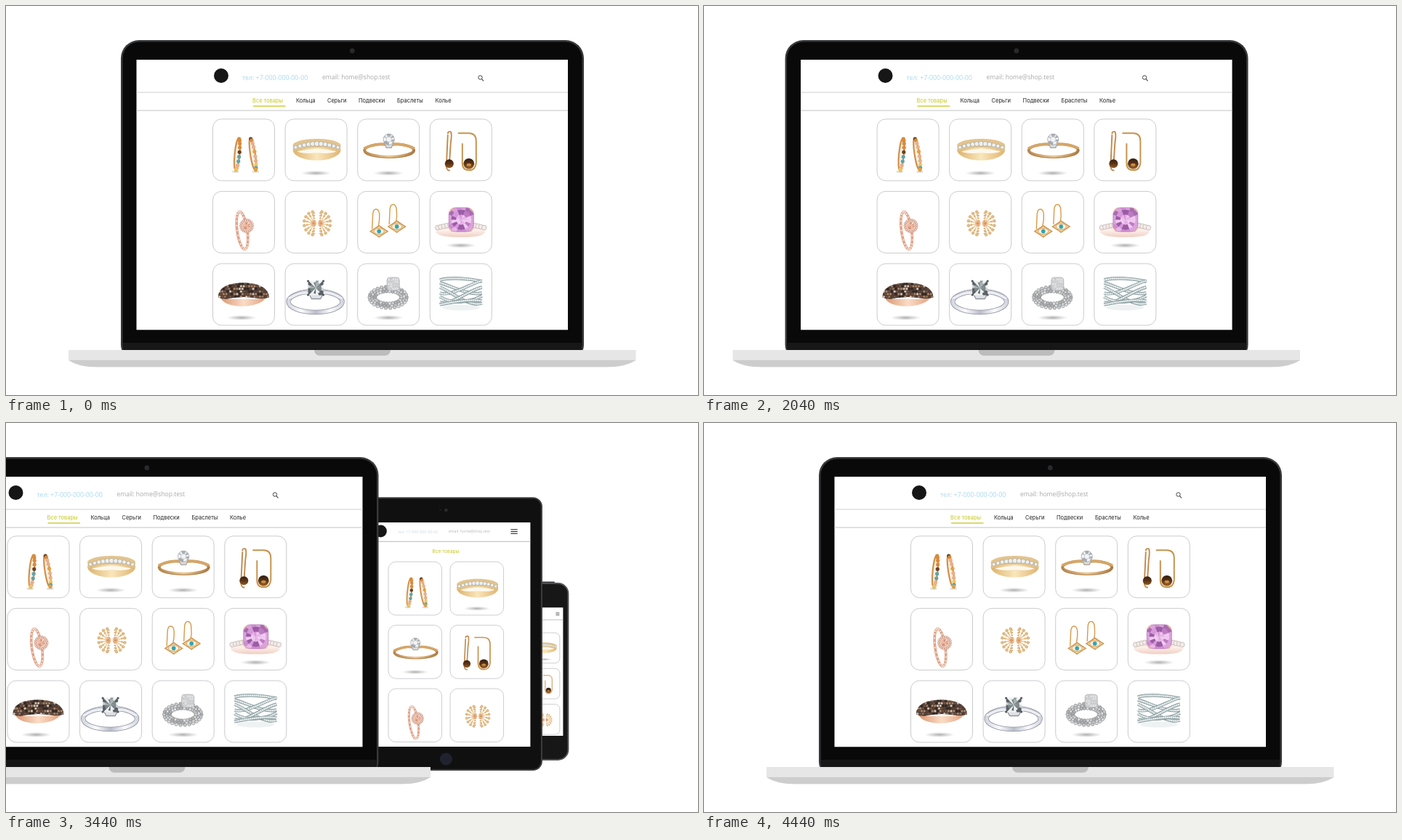
Recreate the animation shown at these times as an HTML page with a canvas. Size 952x536 px, loop 4.48 s.

```html
<!DOCTYPE html>
<html lang="ru">
<head>
<meta charset="utf-8">
<title>Jewellery shop on three screens</title>
<style>
html, body { margin: 0; width: 100%; height: 100%; overflow: hidden; background: #fff; }
canvas { display: block; }
</style>
</head>
<body>
<canvas id="stage" width="952" height="536"></canvas>
<script>
const g = document.getElementById('stage').getContext('2d');
const LOOP = 4480, STEP = 40, MOVE = 300;
const TAU = Math.PI * 2;
const SANS = '"Open Sans", "Noto Sans", sans-serif';
const GEO = 'Inter, Roboto, sans-serif';
const PHONE = 'тел: +7-000-000-00-00', MAIL = 'email: home@shop.test';
const LIME = '#c6c81c';

// ---------- drawing helpers ----------
function paint(fill, stroke, w) {
  if (fill) { g.fillStyle = fill; g.fill(); }
  if (stroke) { g.strokeStyle = stroke; g.lineWidth = w || 1; g.stroke(); }
}
function oval(x, y, rx, ry, fill, stroke, w, rot = 0, from = 0, to = TAU) {
  g.beginPath();
  g.ellipse(x, y, rx, ry, rot, from, to);
  paint(fill, stroke, w);
}
const dot = (x, y, r, fill, stroke, w) => oval(x, y, r, r, fill, stroke, w);
function box(x, y, w, h, r, fill, stroke, lw) {
  g.beginPath();
  g.roundRect(x, y, w, h, r);
  paint(fill, stroke, lw);
}
function shape(d, fill, stroke, w) {
  const p = new Path2D(d);
  if (fill) { g.fillStyle = fill; g.fill(p); }
  if (stroke) { g.strokeStyle = stroke; g.lineWidth = w; g.stroke(p); }
}
function label(s, x, y, size, color, font = SANS, align = 'left') {
  g.font = size + 'px ' + font;
  g.textAlign = align;
  g.fillStyle = color;
  g.fillText(s, x, y);
}
function rule(x, y, w, color, h = 1) {
  g.fillStyle = color;
  g.fillRect(x, y, w, h);
}
function fade(x0, y0, x1, y1, ...colors) {
  const f = g.createLinearGradient(x0, y0, x1, y1);
  colors.forEach((c, i) => f.addColorStop(i / (colors.length - 1), c));
  return f;
}
function repeat(n, fn) {
  for (let i = 0; i < n; i++) fn(i, n > 1 ? i / (n - 1) : 0);
}
const noise = i => { const v = Math.sin(i * 91.7 + 3) * 4375.5; return v - Math.floor(v); };
const pick = (list, i) => list[Math.floor(noise(i) * list.length)];

function clipTo(path, draw) {
  g.save();
  g.clip(path);
  draw();
  g.restore();
}
function shadow(x = 43, y = 75) {
  g.save();
  g.translate(x, y);
  g.scale(1, 0.17);
  const f = g.createRadialGradient(0, 0, 0, 0, 0, 21);
  f.addColorStop(0, 'rgba(90,90,90,.5)');
  f.addColorStop(1, 'rgba(120,120,120,0)');
  dot(0, 0, 21, f);
  g.restore();
}
function gem(x, y, r, tones, seed = 1) {
  repeat(16, i => {
    const a = i * TAU / 16, b = a + TAU / 16 + 0.03;
    g.beginPath();
    g.moveTo(x, y);
    g.lineTo(x + r * Math.cos(a), y + r * Math.sin(a));
    g.lineTo(x + r * Math.cos(b), y + r * Math.sin(b));
    paint(pick(tones, i + seed));
  });
}

// ---------- jewellery, each in an 86 x 86 card ----------
const BEADS = ['#2e2620', '#d98a3a', '#f1c75b', '#6b4225', '#5fa3a8', '#e9b08a', '#e5a13f'];
function hoop(x, lean) {
  const c = Math.cos(lean), s = Math.sin(lean);
  oval(x, 49, 3.4, 22, '#fbf1e4', '#d0914e', 2.2, lean);
  repeat(10, (i, k) => {
    const a = -1.35 + k * 2.7;
    const u = 3 * Math.cos(a), v = 22 * Math.sin(a);
    dot(x + u * c - v * s, 49 + u * s + v * c, 2.6, pick(BEADS, i * 3 + x));
  });
  oval(x - 23 * s, 73, 5, 1.6, 'rgba(120,100,80,.22)');
}
function halfSun(x, dir) {
  oval(x + dir, 44.5, 4, 5, '#edbd92');
  dot(x + dir, 44.5, 2, '#dd9468');
  repeat(8, (i, k) => {
    const a = -1.4 + k * 2.8, u = dir * Math.cos(a), v = Math.sin(a);
    g.beginPath();
    g.moveTo(x + u * 5, 44.5 + v * 6);
    g.lineTo(x + u * 14, 44.5 + v * 16);
    paint(null, '#e7cb9c', 1.6);
    dot(x + u * 10, 44.5 + v * 11.5, 1.4, '#dfb475');
    dot(x + u * 14, 44.5 + v * 16, 1.9, '#e3bf87', '#cf9f62', 0.6);
  });
  repeat(9, i => dot(x, 30.5 + i * 3.5, 1, '#d6a269'));
}
function eye(x, y, hx) {
  shape(`M${x - 1} ${y - 8} C${x + 1} ${y - 14} ${hx + 9} ${y - 18} ${hx + 9} ${y - 24}
    C${hx + 8} ${y - 32} ${hx + 1} ${y - 33} ${hx} ${y - 24} L${hx - 1} ${y - 3}`, null, '#d79b4a', 1.4);
  shape(`M${x - 12} ${y} Q${x - 4} ${y - 5} ${x} ${y - 8} Q${x + 4} ${y - 5} ${x + 12} ${y}
    Q${x + 4} ${y + 5} ${x} ${y + 8} Q${x - 4} ${y + 5} ${x - 12} ${y}Z`, '#f0cf9a', '#c98e45', 1.2);
  oval(x, y, 7, 4, '#fbf3e2', '#c98e45', 0.7);
  dot(x, y, 2.8, '#35a4ad');
}

const items = [
  () => { hoop(34, 0.1); hoop(55.5, -0.16); },
  () => {
    shadow();
    oval(44, 43, 33, 14.5, fade(11, 0, 77, 0, '#dcb26b', '#f9e6bb', '#e0b470'));
    shape('M11 36 C17 25 71 25 77 36 L76 45 C66 38 22 38 12 45Z', '#e3c48d');
    shape('M17 45 Q44 38 71 45 Q64 49 44 47 Q24 49 17 45Z', '#fdf8ec');
    repeat(11, (i, k) => {
      const x = 15 + k * 58;
      dot(x, 34.5 + 5 * (2 * k - 1) ** 2, 3.5 - Math.abs(k - 0.5) * 2, '#eef0ef', '#aaa79c', 0.8);
    });
  },
  () => {
    shadow();
    oval(44, 43.5, 34, 9, null, fade(8, 0, 80, 0, '#b4824a', '#ebc994', '#aa763c'), 4);
    oval(44, 45.5, 34.5, 8.5, null, '#a8713a', 0.9, 0, 0.1, Math.PI - 0.1);
    shape('M9 41 Q25 33 39 36 M79 41 Q62 33 48 36', null, '#d5a668', 3.4);
    shape('M37 33 L40 40 H47 L50 33', '#dddcda', '#a9a49c', 1.2);
    gem(43.5, 28.5, 7.6, ['#f4f5f6', '#c3c6ca', '#dfe1e4', '#a4a9af']);
    dot(43.5, 28.5, 7.6, null, '#9da2a7', 0.8);
    dot(43.5, 28.5, 3.6, '#f3f4f5', '#b6babe', 0.6);
  },
  () => {
    shape('M25 21 Q25 17 29 18 Q31 21 29 33 L27 64 M25 22 L23 66 Q24 72 28 71', null, '#c08a4b', 1.9);
    const ball = fade(0, 53, 0, 71, '#271710', '#5b3416', '#b0702b');
    oval(27, 62, 6, 6, ball);
    shape('M39 20 H54 Q64 20 64 31 V61 Q63 71 54 71 Q45 71 45 61 V34', null, '#c6944f', 2);
    dot(54, 62, 7.4, ball);
    oval(54, 63.5, 3.2, 2, '#c98d42');
  },
  () => {
    oval(41, 54.5, 7, 26, null, '#dfa48a', 3.6, -0.14);
    repeat(24, i => {
      const a = i * TAU / 24, u = 7 * Math.cos(a), v = 26 * Math.sin(a);
      dot(41 + u + v * 0.14, 54.5 + v, 1.1, '#f8e6dd');
    });
    dot(47, 48, 9, '#f1d0c0');
    repeat(18, i => dot(47 + 8.2 * Math.cos(i * TAU / 18), 48 + 8.2 * Math.sin(i * TAU / 18), 1.4, '#f7e9e2', '#c2826a', 0.7));
    gem(47, 48, 5.2, ['#efb9a3', '#fae9df', '#d1917a']);
  },
  () => { halfSun(40.5, -1); halfSun(48.5, 1); },
  () => { eye(30, 55.5, 21.5); eye(54.5, 49, 45); },
  () => {
    shadow();
    shape('M8 52 Q12 43 44 43 Q74 43 77 52 L76 57 Q72 64 43 63.5 Q14 64 9 57Z', fade(0, 44, 0, 64, '#eed2c8', '#fdf0eb', '#f0cdc1'));
    repeat(16, (i, k) => dot(11 + k * 64, 50.5 - 5 * Math.sin(k * Math.PI), 3.3, '#f1ecea', '#c4b3af', 0.8));
    const stone = new Path2D();
    stone.roundRect(26.5, 23, 34, 33, 9);
    clipTo(stone, () => {
      gem(43.5, 39.5, 25, ['#cf8dd2', '#e8b8e9', '#a86bb0', '#dba2dc'], 5);
      gem(43.5, 39.5, 14, ['#f0c9f0', '#bd7cc2', '#d698d9', '#9a5ca4'], 9);
      gem(43.5, 39.5, 7, ['#f3cff2', '#d795d9', '#e9b5e9'], 3);
    });
    g.strokeStyle = '#b57bb8';
    g.lineWidth = 0.8;
    g.stroke(stone);
    shape('M27 29 L32 24 M60 29 L55 24 M27 51 L31 56 M60 51 L56 56', null, '#e8b4a0', 1.6);
  },
  () => {
    shadow(40);
    shape('M11 45 C12 64 68 64 75 45 Q64 51 43 49 Q20 51 11 45Z', fade(11, 0, 75, 0, '#d9966f', '#fbdcc6', '#e1a17c'));
    const dome = new Path2D('M8 47 C8 31 26 27 42 27 C60 27 77 32 78 47 Q70 50 60 48 Q43 45 26 48 Q16 51 8 47Z');
    g.fillStyle = '#4a3a33';
    g.fill(dome);
    clipTo(dome, () => repeat(140, i => {
      const col = i % 20, row = Math.floor(i / 20);
      dot(8 + col * 3.7 + (row % 2) * 1.8, 28 + row * 3.6, 1.6,
        pick(['#2f2724', '#70513f', '#a98468', '#d6c2b0', '#564139', '#96745e'], i));
    }));
  },
  () => {
    oval(42, 53, 37, 14.5, null, '#8b909c', 6.4);
    oval(42, 53, 37, 14.5, null, fade(3, 0, 82, 0, '#d3d6df', '#fbfbfd', '#b9bdc9', '#fbfbfd', '#cfd2dc'), 4.8);
    shape('M5 49 Q22 38 34 41 M79 49 Q62 38 51 41', null, '#9ea3af', 5);
    shape('M5 49 Q22 38 34 41 M79 49 Q62 38 51 41', null, '#eceef3', 3.6);
    shape('M33 42 L37 49 H49 L53 42', '#dfe1e6', '#8e949e', 1.3);
    const stone = new Path2D('M32 24 H53 V44 H32Z');
    clipTo(stone, () => {
      gem(42.5, 34, 16, ['#596166', '#c9cfd0', '#899396', '#eef0f0'], 2);
      gem(42.5, 34, 8, ['#eef1f1', '#5d656a', '#aab2b4', '#7d878a'], 6);
    });
    repeat(4, i => dot(32 + i % 2 * 21, 24.5 + (i >> 1) * 19, 1.6, '#555b60'));
  },
  () => {
    shadow();
    repeat(3, j => repeat(26, i => {
      const a = i * TAU / 26 + j * 0.12;
      dot(42.5 + (25.5 - j * 3.6) * Math.cos(a), 47 + (14.5 - j * 3) * Math.sin(a), 2.3,
        pick(['#dedfe0', '#b1b3b5', '#cbcdce'], i + j * 40), '#85878a', 0.7);
    }));
    box(41, 19.5, 17, 18, 4, '#d3d5d7', '#abadaf', 0.8);
    repeat(25, i => dot(43.4 + i % 5 * 3.1, 22 + Math.floor(i / 5) * 3.3, 0.9, pick(['#e9eaeb', '#bfc1c3'], i)));
  },
  () => {
    const strand = (y0, y1, bend) => {
      const d = `M14 ${y0} C30 ${y0 + bend} 54 ${y1 + bend} 72 ${y1}`;
      shape(d, null, '#7f9295', 4.4);
      shape(d, null, '#b9c6c7', 3);
      g.setLineDash([1.6, 1.1]);
      shape(d, null, '#f2f6f6', 2);
      g.setLineDash([]);
    };
    strand(23, 25, -4);
    strand(27, 41, 4); strand(41, 24, 5);
    strand(33, 55, 6); strand(54, 33, 4);
    strand(46, 45, 10); strand(57, 52, -3);
    oval(43, 61, 26, 4, 'rgba(150,175,175,.16)');
  }
];

function cards(x, y, dx, dy, size, cols, rows, radius) {
  const k = size / 86;
  repeat(cols * rows, i => {
    g.save();
    g.translate(x + i % cols * dx, y + Math.floor(i / cols) * dy);
    g.scale(k, k);
    box(0.5, 0.5, 85, 85, radius / k, '#fff', '#bebec2', Math.max(0.8, 0.75 / k));
    items[i]();
    g.restore();
  });
}
function screen(x, y, w, h, draw) {
  g.save();
  g.beginPath();
  g.rect(x, y, w, h);
  g.fillStyle = '#fff';
  g.fill();
  g.clip();
  draw();
  g.restore();
}
function burger(x, y, w, gap, color) {
  repeat(3, i => rule(x, y + i * gap, w, color, gap * 0.4));
}

// ---------- devices ----------
function laptop() {
  box(158, 47, 637, 440, [25, 25, 20, 20], '#37383a');
  box(160.5, 49.5, 632, 436, [22.5, 22.5, 18, 18], '#090909');
  rule(161, 464, 631, '#171717', 11);
  dot(476.3, 61.7, 3.4, '#29292d');
  screen(179.5, 74, 593.5, 372.3, () => {
    dot(296, 96, 10, '#161616');
    label(PHONE, 325, 101.5, 8.8, '#a8d8f0');
    label(MAIL, 435, 100.5, 8.5, '#a9a9a9');
    dot(652.5, 98.5, 2.7, null, '#444', 1);
    shape('M654.5 100.7 L657 103.3', null, '#444', 1.2);
    rule(179, 118.5, 595, '#cfcfcf');
    rule(179, 143.5, 595, '#c4c4c4');
    label('Все товары', 339, 133.2, 7.5, LIME, GEO);
    rule(340, 137.3, 44.5, LIME, 1.3);
    const menu = { 'Кольца': 399, 'Серьги': 442, 'Подвески': 485, 'Браслеты': 538, 'Колье': 590.5 };
    for (const name in menu) label(name, menu[name], 133.2, 7.5, '#222', GEO);
    cards(284, 155.3, 99.6, 99.6, 86, 4, 3, 12);
  });
  rule(86, 474, 780.5, '#e6e6e6', 14.3);
  shape('M86 488 H866.5 Q852 497.5 826 497.5 H126 Q100 497.5 86 488Z', '#cdcdcd');
  box(424, 474, 105, 7.8, [0, 0, 8, 8], '#bcbcbc');
}

function tablet() {
  box(481, 102.3, 264.5, 376.7, 13, '#3d3d40');
  box(483, 104.3, 260.5, 372.7, 11, '#101010');
  dot(613, 120, 2.3, '#2b2b30');
  dot(605, 120, 1, '#26262a');
  dot(613, 463, 8.6, '#20222f');
  screen(497.5, 137, 231.5, 309, () => {
    dot(523, 149, 8.5, '#161616');
    label(PHONE, 546.5, 151.7, 5.4, '#cbdbe8');
    label(MAIL, 616.5, 151.2, 5.2, '#b5b5b5');
    burger(702, 146.2, 9.3, 2.8, '#333');
    rule(497, 162.8, 233, '#b9b9b9');
    label('Все товары', 612.5, 178.8, 6.6, LIME, GEO, 'center');
    cards(533.2, 190.8, 85, 87.4, 74.4, 2, 3, 10.4);
  });
}

function phone() {
  box(808, 218.5, 19, 4, 1, '#39393b');
  box(730, 220, 116.5, 245, 15, '#505052');
  box(732, 222, 112.5, 241, 13, '#171717');
  dot(788.3, 232, 2.3, '#39393d');
  box(779, 239.6, 19.5, 2.7, 1.3, '#424245');
  dot(788.5, 448, 10.3, '#303032', '#4a4a4c', 0.8);
  screen(738, 254.3, 100.5, 176.7, () => {
    dot(753, 263, 4.5, '#161616');
    burger(828.5, 261, 5, 1.8, '#555');
    rule(738, 270.7, 101, '#b9b9b9', 0.9);
    label('Все товары', 788.7, 282.3, 4, '#d3cc55', GEO, 'center');
    cards(743.3, 288.8, 48.6, 49.2, 42.3, 2, 3, 6.5);
  });
}

// ---------- motion ----------
function ease(x) {
  x = Math.min(1, Math.max(0, x));
  return x < 0.5 ? 2 * x * x : 1 - 2 * (1 - x) ** 2;
}
// How far a device is spread out, given when it leaves and returns.
const spread = (t, out, back) => ease((t - out) / MOVE) - ease((t - back) / MOVE);

function place(dx, draw) {
  g.save();
  g.translate(dx, 0);
  draw();
  g.restore();
}
function frame(now) {
  const t = Math.floor((now - start) % LOOP / STEP) * STEP;
  g.fillStyle = '#fff';
  g.fillRect(0, 0, 952, 536);
  const a = spread(t, 1954, 3441), b = spread(t, 2007, 3390), c = spread(t, 2060, 3338);
  if (c > 0) place(-312 * (1 - c), phone);
  if (b > 0) place(-137 * (1 - b), tablet);
  place(-282.5 * a, laptop);
}
function tick() {
  frame(performance.now());
  requestAnimationFrame(tick);
}
const start = performance.now();
tick();
</script>
</body>
</html>
```
